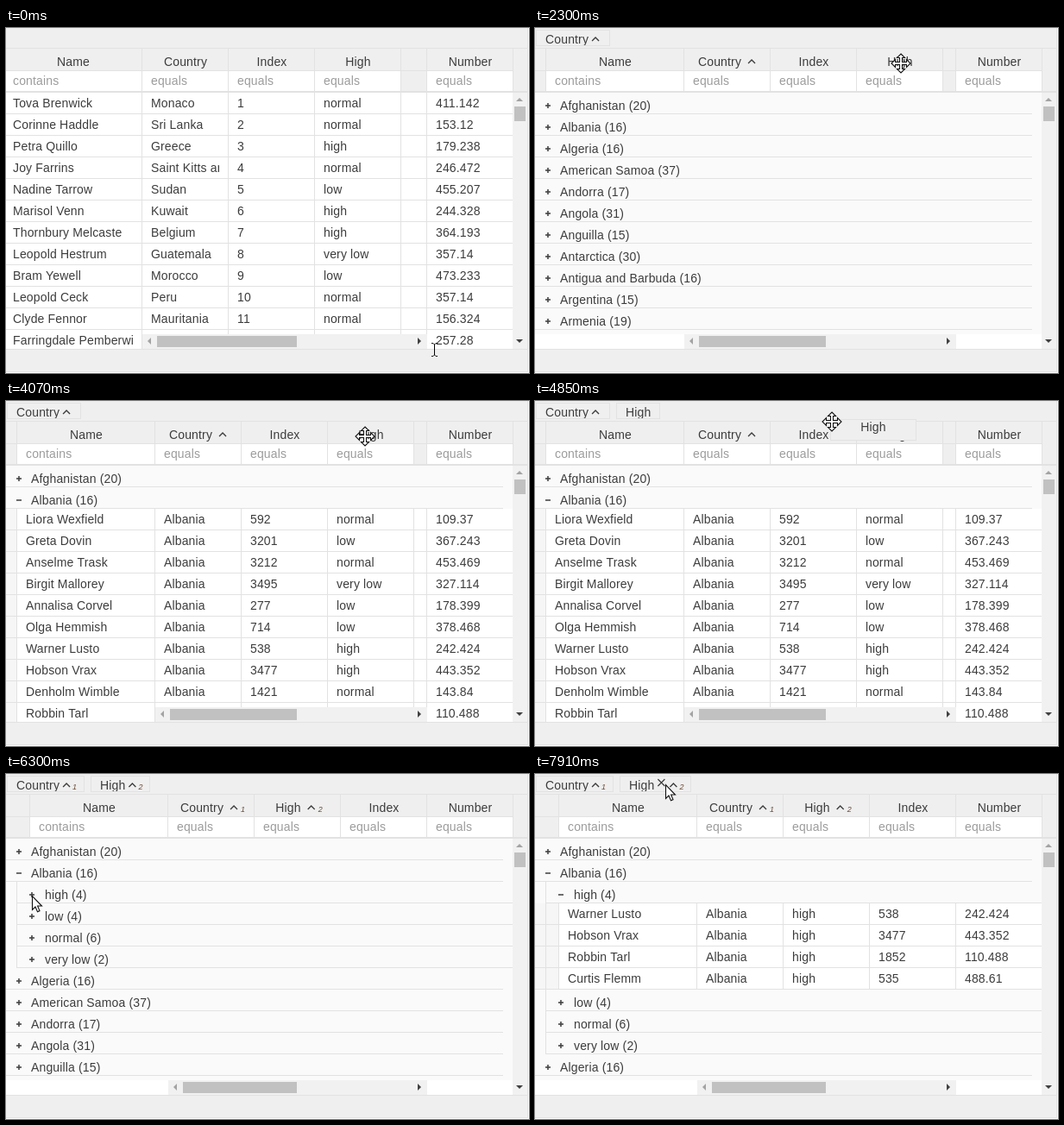
Write an HTML page with a canvas that moves like this. It is 606 px wide and 400 px high and loops after 7.99 s.

```html
<!DOCTYPE html>
<html>
<head>
<meta charset="utf-8">
<style>
html, body { margin: 0; width: 100%; height: 100%; overflow: hidden; background: #fff; }
canvas { display: block; }
</style>
</head>
<body>
<canvas id="stage" width="606" height="400"></canvas>
<script>
const ctx = document.getElementById('stage').getContext('2d');
const LOOP = 7990, STEP = 75;
const FONT = '14px "Liberation Sans", Arial, sans-serif';
const GRAY = '#efefef', LINE = '#e2e2e2', INK = '#3c3c3c';

const parse = text => text.trim().split('\n').map(line => line.split(','));
const flatRows = parse(`
Tova Brenwick,Monaco,1,normal,411.142
Corinne Haddle,Sri Lanka,2,normal,153.12
Petra Quillo,Greece,3,high,179.238
Joy Farrins,Saint Kitts and Nevis,4,normal,246.472
Nadine Tarrow,Sudan,5,low,455.207
Marisol Venn,Kuwait,6,high,244.328
Thornbury Melcaste,Belgium,7,high,364.193
Leopold Hestrum,Guatemala,8,very low,357.14
Bram Yewell,Morocco,9,low,473.233
Leopold Ceck,Peru,10,normal,357.14
Clyde Fennor,Mauritania,11,normal,156.324
Farringdale Pemberwick,Malta,12,normal,257.28`);
const albania = parse(`
Liora Wexfield,Albania,592,normal,109.37
Greta Dovin,Albania,3201,low,367.243
Anselme Trask,Albania,3212,normal,453.469
Birgit Mallorey,Albania,3495,very low,327.114
Annalisa Corvel,Albania,277,low,178.399
Olga Hemmish,Albania,714,low,378.468
Warner Lusto,Albania,538,high,242.424
Hobson Vrax,Albania,3477,high,443.352
Denholm Wimble,Albania,1421,normal,143.84
Robbin Tarl,Albania,1852,high,110.488`);
const albaniaHigh = parse(`
Warner Lusto,Albania,high,538,242.424
Hobson Vrax,Albania,high,3477,443.352
Robbin Tarl,Albania,high,1852,110.488
Curtis Flemm,Albania,high,535,488.61`);

const group = (label, depth = 0, open = false) => ({ label, depth, open });
const countries = ['Afghanistan (20)', 'Albania (16)', 'Algeria (16)', 'American Samoa (37)', 'Andorra (17)',
  'Angola (31)', 'Anguilla (15)', 'Antarctica (30)', 'Antigua and Barbuda (16)', 'Argentina (15)',
  'Armenia (19)', 'Aruba (21)'].map(label => group(label));
const top2 = [countries[0], group('Albania (16)', 0, true)];
const levels = ['high (4)', 'low (4)', 'normal (6)', 'very low (2)'].map(label => group(label, 1));

const byName = ['Name', 'Country', 'Index', 'High', 'Number'];
const byLevel = ['Name', 'Country', 'High', 'Index', 'Number'];
function viewAt(t) {
  if (t < 1430) return { indent: 0, columns: byName, sorted: [], rows: flatRows };
  if (t < 5150) return { indent: 1, columns: byName, sorted: ['Country'],
    rows: t < 3370 ? countries : [...top2, ...albania] };
  const inner = t < 6850 ? levels : [group('high (4)', 1, true), ...albaniaHigh, ...levels.slice(1)];
  return { indent: 2, columns: byLevel, sorted: ['Country', 'High'],
    rows: [...top2, ...inner, ...countries.slice(2)].slice(0, 12) };
}

// Pointer moves: start, end, x, y
const moves = [
  [70, 820, 206, 41], [980, 1280, 164, 13], [1430, 2220, 434, 39], [2300, 3060, 16, 123],
  [3520, 4000, 415, 41], [4070, 4220, 419, 41], [4460, 4610, 378, 32], [4850, 4850, 344, 24],
  [5000, 5000, 378, 32], [5150, 5230, 408, 124], [5300, 5920, 36, 176], [6000, 6300, 30, 141],
  [6850, 7610, 172, 60], [7680, 7910, 151, 12]];
function pointerAt(t) {
  let x = 496, y = 373;
  for (const [start, end, toX, toY] of moves) {
    if (t < start) break;
    const steps = Math.floor((end - start) / STEP) + 1;
    const p = Math.min(1, (Math.floor((t - start) / STEP) + 1) / steps);
    const eased = p * p * (3 - 2 * p);
    x += (toX - x) * eased;
    y += (toY - y) * eased;
  }
  return { x: Math.round(x), y: Math.round(y) };
}
const draggedAt = t => t >= 1210 && t < 1430 ? 'Country' : t >= 4530 && t < 5150 ? 'High' : null;

function rect(x, y, w, h, color) {
  ctx.fillStyle = color;
  ctx.fillRect(x, y, w, h);
}
function frame(x, y, w, h) {
  ctx.strokeStyle = LINE;
  ctx.lineWidth = 1;
  ctx.strokeRect(x + .5, y + .5, w - 1, h - 1);
}
function text(s, x, y, color = INK, font = FONT) {
  ctx.font = font;
  ctx.fillStyle = color;
  ctx.fillText(s, x, y);
}
function widthOf(s) {
  ctx.font = FONT;
  return ctx.measureText(s).width;
}
function clippedText(s, x, y, w) {
  ctx.save();
  ctx.beginPath();
  ctx.rect(x, y - 16, w, 24);
  ctx.clip();
  text(s, x, y);
  ctx.restore();
}
function strokePath(d, x, y, color, width) {
  ctx.save();
  ctx.translate(x, y);
  ctx.strokeStyle = color;
  ctx.lineWidth = width;
  ctx.stroke(new Path2D(d));
  ctx.restore();
}
const caret = (x, y) => strokePath('M-4 2L0 -2L4 2', x, y, INK, 1.3);
const orderMark = (n, x, y) => text(n, x, y, '#6b4a35', 'italic 9px "Liberation Sans", Arial, sans-serif');

// Arrowhead pointing along (dx, dy)
function triangle(x, y, dx, dy, color) {
  ctx.fillStyle = color;
  ctx.beginPath();
  ctx.moveTo(x + dx * 2, y + dy * 2);
  ctx.lineTo(x - dx * 2 + dy * 4, y - dy * 2 + dx * 4);
  ctx.lineTo(x - dx * 2 - dy * 4, y - dy * 2 - dx * 4);
  ctx.fill();
}

function drawPanel({ sorted }, dragged, pointer) {
  let x = 1;
  sorted.forEach((name, i) => {
    const numbered = sorted.length > 1;
    let w = Math.round(widthOf(name)) + (numbered ? 40 : 36);
    const hover = pointer.y < 24 && pointer.x > x && pointer.x < x + w;
    let mark = x + 11 + widthOf(name) + 8;
    text(name, x + 11, 18);
    if (hover) {
      strokePath('M-4 -4L4 4M4 -4L-4 4', mark, 10, INK, 1.2);
      mark += 14;
      w += 14;
    }
    caret(mark, 13);
    if (numbered) orderMark(i + 1, mark + 7, 18);
    frame(x, 2, w, 19);
    x += w + 7;
  });
  if (dragged) {
    text(dragged, x + 11, 18);
    frame(x, 2, Math.round(widthOf(dragged)) + 22, 19);
  }
}

function drawHeader({ columns, sorted }, edges) {
  columns.forEach((name, i) => {
    const [x, w] = edges[i];
    const order = sorted.indexOf(name);
    const extra = order < 0 ? 0 : sorted.length > 1 ? 22 : 18;
    const textWidth = widthOf(name);
    const left = x + w / 2 - (textWidth + extra) / 2;
    text(name, left, 44);
    if (extra) caret(left + textWidth + 12, 39);
    if (extra === 22) orderMark(order + 1, left + textWidth + 20, 44);
    rect(x, 50, w - 1, 23, '#fff');
    text(i ? 'equals' : 'contains', x + 10, 66, '#9c9c9c');
    rect(x + w - 1, 24, 1, 50, LINE);
  });
  rect(0, 49, 588, 1, LINE);
  rect(487, 24, 1, 50, LINE);
}

function drawGroup({ label, depth, open }, y) {
  rect(0, y, 588, 25, '#fafafa');
  if (depth) rect(12, y, 1, 25, LINE);
  rect(depth ? 12 : 0, y + 24, 576, 1, LINE);
  const x = 15 + 15 * depth;
  strokePath(open ? 'M-3 0H3' : 'M-3 0H3M0 -3V3', x, y + 15, INK, 1.5);
  text(label, x + 14 + depth, y + 20);
}

function drawRecord(cells, y, indent, edges) {
  rect(0, y, 588, 25, '#fff');
  rect(0, y, Math.max(0, 15 * indent - 2), 25, '#f6f6f6');
  rect(0, y + 24, 588, 1, LINE);
  for (let i = 1; i <= indent; i++) rect(15 * i - 3, y, 1, 25, LINE);
  cells.forEach((value, i) => {
    const [x, w] = edges[i];
    clippedText(value, x + 10, y + 17, w - 21);
    rect(x + w - 1, y, 1, 25, LINE);
  });
  rect(487, y, 1, 25, LINE);
}

function drawScrollbars(left) {
  rect(left, 355, 488 - left, 17, '#f1f1f1');
  rect(left + 17, 357, 320 - left, 13, '#c1c1c1');
  triangle(left + 8, 363, -1, 0, '#a3a3a3');
  triangle(479, 363, 1, 0, '#404040');
  rect(587, 75, 17, 297, '#f1f1f1');
  rect(589, 91, 13, 17, '#c1c1c1');
  triangle(595, 83, 0, -1, '#a3a3a3');
  triangle(595, 363, 0, 1, '#404040');
}

const movePath = new Path2D('M0 -11L4.5 -6.5H1.5V-1.5H6.5V-4.5L11 0L6.5 4.5V1.5H1.5V6.5H4.5L0 11L-4.5 6.5H-1.5V1.5H-6.5V4.5L-11 0L-6.5 -4.5V-1.5H-1.5V-6.5H-4.5Z');
const arrowPath = new Path2D('M.5 .5V16.5L4 13L6.5 18.7L9 17.6L6.6 12H11.5Z');
function drawPointer({ x, y }, dragging, flat) {
  const overInput = y >= 50 && y < 74 || flat && y >= 74;
  const overHeader = y >= 24 && y < 50;
  if (overInput && !dragging) {
    strokePath('M-3 -7.5H-1L.5 -6L2 -7.5H4M.5 -6V6M-3 7.5H-1L.5 6L2 7.5H4', x, y, '#000', 1);
    return;
  }
  ctx.save();
  ctx.translate(x, y);
  const shape = dragging || overHeader ? movePath : arrowPath;
  ctx.fillStyle = '#fff';
  ctx.strokeStyle = '#111';
  ctx.lineWidth = 1.1;
  ctx.fill(shape);
  ctx.stroke(shape);
  ctx.restore();
}

function draw(t) {
  const view = viewAt(t), pointer = pointerAt(t), dragged = draggedAt(t);
  const left = 15 * view.indent - 2;
  const edges = [[left, 160], [left + 160, 100], [left + 260, 100], [left + 360, 100], [488, 100]];
  ctx.letterSpacing = '0.15px';
  rect(0, 0, 606, 400, '#fff');
  rect(0, 0, 604, 398, GRAY);
  rect(0, 23, 604, 1, LINE);
  drawPanel(view, dragged, pointer);
  drawHeader(view, edges);
  for (let i = 1; i <= view.indent; i++) if (i === view.indent) rect(15 * i - 3, 24, 1, 50, LINE);
  rect(0, 73, 604, 2, LINE);

  ctx.save();
  ctx.beginPath();
  ctx.rect(0, 75, 588, 297);
  ctx.clip();
  view.rows.forEach((row, i) => {
    const y = 75 + 25 * i;
    if (Array.isArray(row)) drawRecord(row, y, view.indent, edges);
    else drawGroup(row, y);
  });
  if (!Array.isArray(view.rows[11])) rect(0, 355, 588, 17, '#fff');
  ctx.restore();

  drawScrollbars(left + 160);
  rect(0, 372, 604, 1, LINE);
  rect(0, 398, 605, 1, LINE);
  rect(604, 0, 1, 399, LINE);

  if (dragged) {
    const x = pointer.x - 2, y = pointer.y - 3;
    rect(x, y, 100, 25, GRAY);
    frame(x, y, 100, 25);
    text(dragged, x + 50 - widthOf(dragged) / 2, y + 14);
  }
  drawPointer(pointer, dragged, !view.indent);
}

function tick() {
  draw(performance.now() % LOOP);
  requestAnimationFrame(tick);
}
tick();
</script>
</body>
</html>
```
